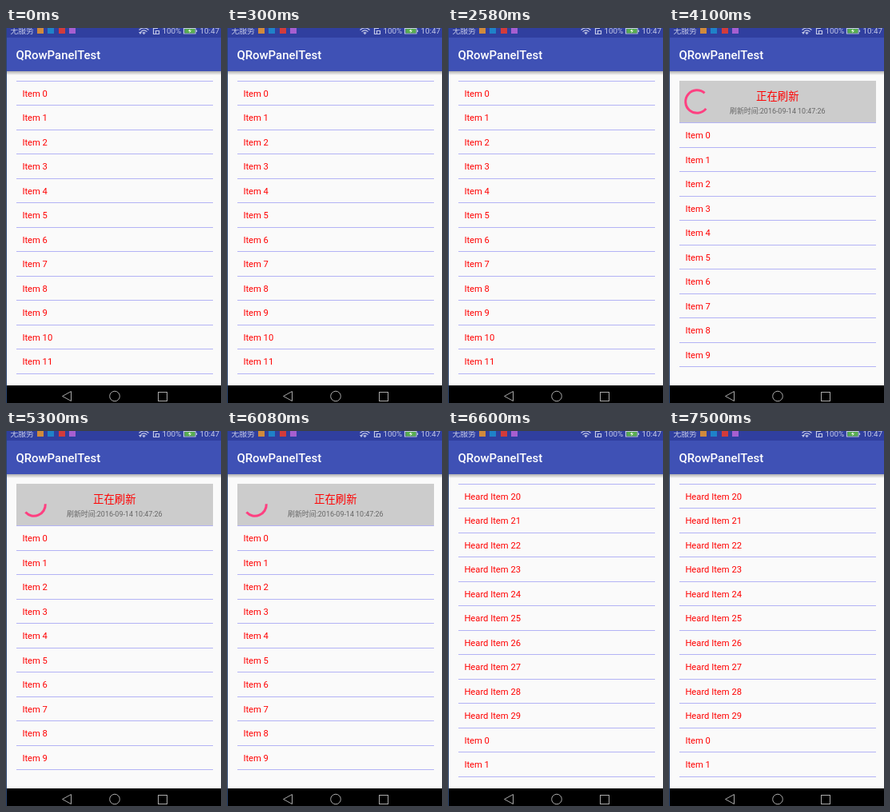
An HTML page that plays this animation: 269 by 469 pixels, repeating every 8000 ms.

```html
<!DOCTYPE html>
<html lang="zh-CN">
<head>
<meta charset="utf-8">
<title>Pull to refresh</title>
<style>
  html, body { margin: 0; width: 100%; height: 100%; overflow: hidden; background: #fafafa; }
  svg { display: block; width: 100vw; height: 100vh; font-family: Roboto, "Noto Sans CJK SC", "Noto Sans CJK", sans-serif; }
  .title { font-size: 14.9px; font-weight: 500; fill: #fff; }
  .status { font-size: 9.8px; fill: #c3c8e6; }
  .row { font-size: 11.2px; fill: #f00; }
  .busy { font-size: 13.4px; fill: #f00; }
  .stamp { font-size: 8.93px; fill: #666; }
  .line { fill: none; stroke: #aaa; }
</style>
</head>
<body>
<svg viewBox="0 0 269 469">
  <defs>
    <linearGradient id="shade" x2="0" y2="1">
      <stop stop-color="#000" stop-opacity=".3"/>
      <stop offset="1" stop-color="#000" stop-opacity="0"/>
    </linearGradient>
  </defs>
  <rect width="269" height="469" fill="#fafafa"/>
  <rect y="54" width="269" height="5" fill="url(#shade)"/>
  <rect width="269" height="12" fill="#303f9f"/>
  <rect y="12" width="269" height="42" fill="#3f51b5"/>
  <text class="title" x="12.5" y="39">QRowPanelTest</text>

  <g class="status">
    <text x="5.5" y="7">无服务</text>
    <text x="195.5" y="7">100%</text>
    <text x="242.5" y="7">10:47</text>
  </g>
  <rect x="39" width="8" height="7" fill="#d08a3c"/>
  <rect x="52" width="8" height="7" fill="#1f82c8"/>
  <rect x="66" width="8" height="7" fill="#d23b3b"/>
  <rect x="79" width="8" height="7" fill="#a65fd0"/>
  <g fill="none" stroke="#c3c8e6" stroke-width="1.2">
    <path d="M166.5 2.5Q172.5-2.5 178.5 2.5M168.5 4.6Q172.5 1.2 176.5 4.6M170.6 6.4Q172.5 4.8 174.4 6.4"/>
    <path d="M187 7.5H184.5V.5H190M187.5 3.5H191.5V7.5H187.5Z"/>
    <path d="M222.5 .5H237V7H222.5ZM238.5 2.5V5"/>
  </g>
  <circle cx="172.5" cy="7" r="1" fill="#c3c8e6"/>
  <rect x="223.5" y="1" width="13" height="5.5" fill="#58ad50"/>
  <path d="M230.5 1L228 4H230L229 6.5L232 3.3H230Z" fill="#fff"/>
  <path id="traffic" d="M166 5H170L168 8Z" fill="#c3c8e6"/>

  <g id="header">
    <rect x="13" y="66" width="246" height="52" fill="#ccc"/>
    <path id="spinner" fill="none" stroke="#ff4081" stroke-width="3"/>
    <text class="busy" x="109" y="90">正在刷新</text>
    <text class="stamp" x="76" y="107">刷新时间:2016-09-14 10:47:26</text>
  </g>
  <g id="list"></g>

  <rect y="447" width="269" height="22" fill="#000"/>
  <path class="line" d="M81.5 454.5V466.5L70.5 460.5Z"/>
  <circle class="line" cx="136" cy="460.5" r="6.3"/>
  <rect class="line" x="190.5" y="455.5" width="11" height="11"/>
  <rect width="1" height="469" fill="#2b456f"/>
</svg>
<script>
  const LOOP = 8000, PITCH = 30.5;
  const $ = id => document.getElementById(id);

  const items = count => Array.from({ length: count }, (_, i) => `Item ${i}`);
  const refreshed = [...Array.from({ length: 10 }, (_, i) => `Heard Item ${20 + i}`), ...items(2)];

  const states = [
    { at: 0, rows: items(12), traffic: true },
    { at: 300, rows: items(12) },
    { at: 4100, rows: items(10), traffic: true, arc: [38, 312] },
    { at: 5300, rows: items(10), traffic: true, arc: [-3, 138] },
    { at: 6600, rows: refreshed },
    { at: 7500, rows: refreshed, traffic: true }
  ];

  const divider = y => `<rect x="13" y="${Math.floor(y)}" width="246" height="1" fill="#b3b3f5"/>`;

  function listMarkup(rows, top) {
    return divider(top) + rows.map((label, i) => {
      const y = top + i * PITCH;
      return `<text class="row" x="20.4" y="${Math.floor(y + 20)}">${label}</text>` + divider(y + PITCH);
    }).join('');
  }

  function arcPath([from, to]) {
    const point = deg => {
      const a = deg * Math.PI / 180;
      return `${35 + 14.3 * Math.cos(a)} ${92 + 14.3 * Math.sin(a)}`;
    };
    return `M${point(from)}A14.3 14.3 0 ${to - from > 180 ? 1 : 0} 1 ${point(to)}`;
  }

  let shown;
  function draw(now) {
    const time = now % LOOP;
    const state = states.findLast(s => s.at <= time);
    if (state !== shown) {
      shown = state;
      const { rows, traffic, arc } = state;
      $('list').innerHTML = listMarkup(rows, arc ? 118.5 : 66);
      $('traffic').style.display = traffic ? '' : 'none';
      $('header').style.display = arc ? '' : 'none';
      if (arc) $('spinner').setAttribute('d', arcPath(arc));
    }
  }

  const start = performance.now();
  function tick() {
    draw(performance.now() - start);
    requestAnimationFrame(tick);
  }
  tick();
</script>
</body>
</html>
```
